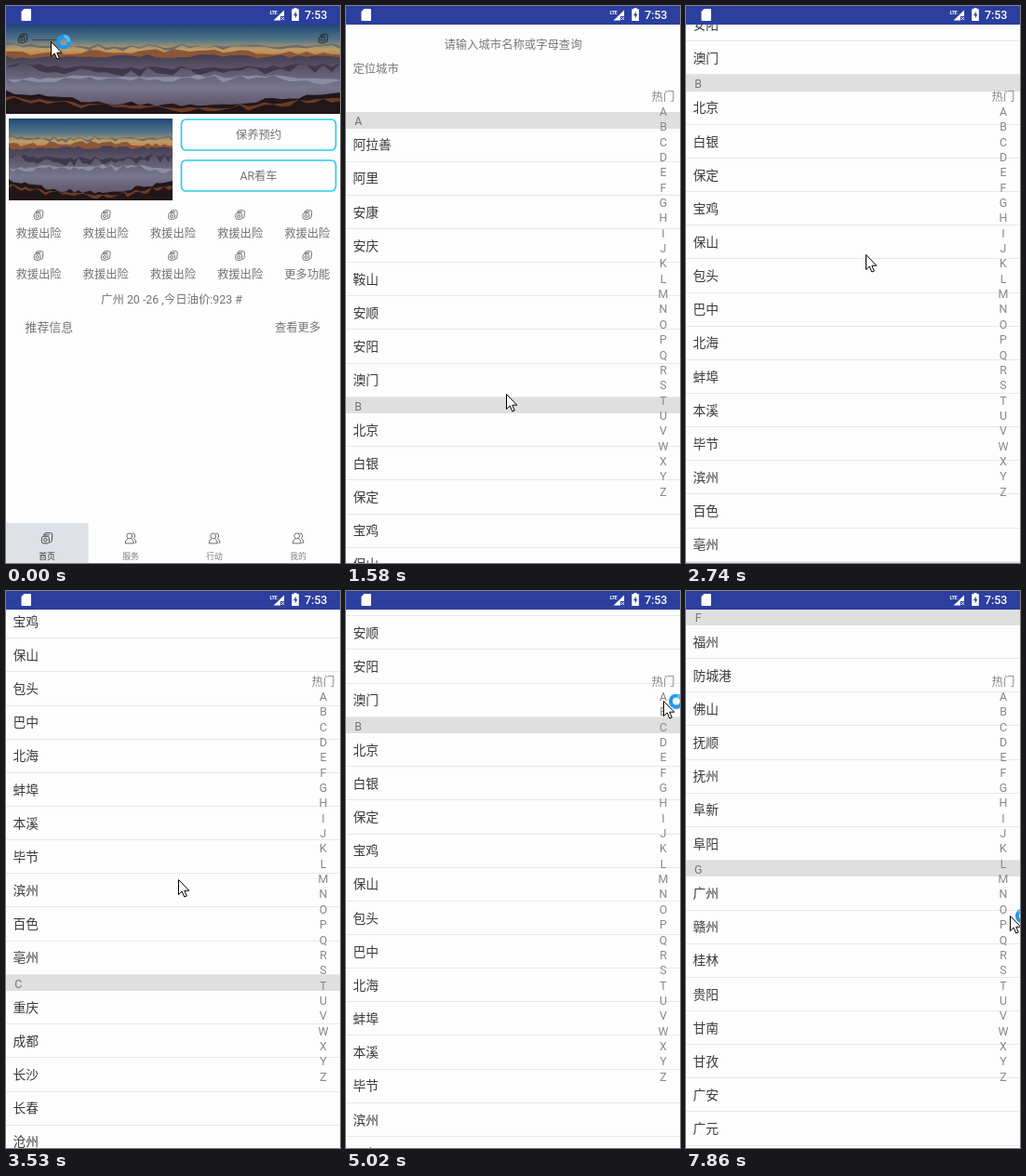
Animation, 359 px wide and 599 px high, one loop 8000 ms. Source, as an HTML page:

```html
<!DOCTYPE html>
<html lang="zh-CN">
<head>
<meta charset="utf-8">
<title>City picker</title>
<style>
  html, body { margin: 0; width: 100%; height: 100%; overflow: hidden; background: #fff; }
  svg { display: block; }
  text { font-family: Roboto, "Noto Sans CJK SC", "Noto Sans CJK", sans-serif; white-space: pre; }

  #page { animation: open 8s infinite ease-out; }
  #list { animation: scroll 8s infinite; }
  #cursor { animation: point 8s infinite steps(4); }
  #ring { animation: busy 8s infinite step-end; }
  #arc { animation: spin 1s infinite linear; }

  @keyframes open {
    0%, 6.62% { opacity: 0; transform: translateY(28px); }
    6.625% { opacity: .5; transform: translateY(28px); }
    13%, 100% { opacity: 1; transform: none; }
  }
  @keyframes scroll {
    0%, 21.1% { transform: translateY(0); animation-timing-function: steps(8); }
    34.2% { transform: translateY(-346.5px); animation-timing-function: steps(6); }
    44% { transform: translateY(-531.5px); animation-timing-function: steps(5); }
    52.2% { transform: translateY(-285px); animation-timing-function: step-end; }
    68.125% { transform: translateY(0); animation-timing-function: step-end; }
    81.25%, 100% { transform: translateY(var(--jump)); }
  }
  @keyframes point {
    0%, 8.1% { transform: translate(48px, 38px); }
    13% { transform: translate(83px, 150px); }
    17.9% { transform: translate(172px, 441px); }
    19.6% { transform: translate(172px, 417px); }
    27.6% { transform: translate(186px, 225px); }
    34.2% { transform: translate(193px, 267px); }
    37.5% { transform: translate(188px, 420px); }
    44% { transform: translate(185px, 310px); }
    48.9% { transform: translate(205px, 470px); }
    52.2% { transform: translate(329px, 110px); }
    62.7%, 68% { transform: translate(341px, 118px); }
    71% { transform: translate(340px, 136px); }
    76% { transform: translate(343px, 184px); }
    79.3%, 88% { transform: translate(343px, 190px); }
    90%, 95% { transform: translate(348px, 250px); }
    98.2%, 100% { transform: translate(348px, 349px); }
  }
  @keyframes busy {
    0% { visibility: visible; }
    8.1% { visibility: hidden; }
    61.1%, 100% { visibility: visible; }
  }
  @keyframes spin { to { transform: rotate(360deg); } }
</style>
</head>
<body>
<svg width="359" height="599" viewBox="0 0 359 599">
  <defs>
    <linearGradient id="sky" x1="0" y1="0" x2="0" y2="1">
      <stop offset="0" stop-color="#1f4673"/>
      <stop offset=".17" stop-color="#527489"/>
      <stop offset=".28" stop-color="#bd9d68"/>
      <stop offset=".36" stop-color="#c77a38"/>
    </linearGradient>
    <linearGradient id="mist" x1="0" y1="0" x2="0" y2="1">
      <stop offset="0" stop-color="#443c50"/>
      <stop offset=".55" stop-color="#77768e"/>
      <stop offset="1" stop-color="#57475a"/>
    </linearGradient>
    <symbol id="view" viewBox="0 0 360 96" preserveAspectRatio="none"><g id="ridges"></g></symbol>
    <symbol id="card" viewBox="0 0 12 12" overflow="visible">
      <g fill="none" stroke="currentColor" stroke-width=".9">
        <rect x=".8" y="4.200" width="7.400" height="7" rx="2"/>
        <path d="M3 4Q2.800 1 5 .8H9.500Q11.500.8 11.300 3L10.800 8.500Q10.600 10 8.800 10.300M3.500 2.800H8.500"/>
        <circle cx="4.500" cy="7.700" r="1.600"/>
      </g>
    </symbol>
    <symbol id="people" viewBox="0 0 12 12" overflow="visible">
      <g fill="none" stroke="currentColor" stroke-width=".9">
        <circle cx="4.800" cy="3.800" r="2.700"/>
        <path d="M3.400 6.400Q.8 7.200.6 11.200H9Q8.800 7.400 6.400 6.400M7.400 1Q10.400.8 10.300 3.800 10.200 5.600 9 6.200 11.400 7.400 11.500 10.400H10"/>
      </g>
    </symbol>
  </defs>

  <g id="home"></g>
  <g id="page">
    <rect y="20" width="359" height="640" fill="#fdfdfd"/>
    <g id="list"></g>
    <g id="index"></g>
  </g>

  <g id="status">
    <rect width="359" height="20" fill="#2c3f9f"/>
    <g fill="#fff">
      <path d="M19.500 3H26Q27 3 27 4V15Q27 16 26 16H17.500Q16.500 16 16.500 15V6Z"/>
      <path d="M287.500 15.500L299 4.500V11H295V15.500Z"/>
      <path d="M309.500 3.200V2H312.500V3.200H314.800V16H307.200V3.200Z"/>
      <path d="M296 12L299 15M299 12L296 15" stroke="#fff"/>
      <text x="283.500" y="8.500" font-size="5.500" font-weight="700" letter-spacing="-.4">LTE</text>
      <text x="321" y="14" font-size="12.400" font-weight="500">7:53</text>
    </g>
    <path d="M311.800 5.500L309 10.300H310.800V13.500L313.300 8.800H311.500Z" fill="#2c3f9f"/>
  </g>

  <g id="cursor">
    <g id="ring"><g transform="translate(14 .5)" fill="none">
      <circle r="6" fill="#bfe6ff" fill-opacity=".25" stroke="#2196ea" stroke-width="4"/>
      <path id="arc" d="M0-6A6 6 0 0 1 6 0" stroke="#58c3fa" stroke-width="3"/>
    </g></g>
    <path d="M.5.500V16.500L4.200 13 6.800 19 9.300 18 6.800 12.200H11.800Z" fill="#fff" stroke="#000"/>
  </g>
</svg>
<script>
const $ = id => document.getElementById(id);
const GREY = '#747474';

// Text centred vertically on y
const label = (x, y, str, size = 12.3, fill = GREY, anchor = 'middle') =>
  `<text x="${x}" y="${y + size * .37}" font-size="${size}" fill="${fill}" text-anchor="${anchor}">${str}</text>`;
const icon = (id, x, y, size, color = '#555') =>
  `<use href="#${id}" x="${x - size / 2}" y="${y - size / 2}" width="${size}" height="${size}" color="${color}"/>`;

let seed = 7;
const rand = () => (seed = seed * 16807 % 2147483647) / 2147483647;

// Jagged mountain line, sagging in the middle, filled downwards
function ridge(y, sag, rough, fill, depth = 96) {
  let top = '', bottom = '';
  for (let x = 0; x <= 360; x += 9) {
    const h = y + sag * Math.sin(x / 360 * Math.PI) + (rand() - .5) * rough;
    top += `${x},${h} `;
    bottom = `${x},${h + depth * rand()} ` + bottom;
  }
  return `<polygon points="${top}${depth < 96 ? bottom : '360,96 0,96'}" fill="${fill}"/>`;
}

function buildView() {
  $('ridges').innerHTML = '<rect width="360" height="96" fill="url(#sky)"/>' +
    ridge(21, 2, 5, '#6f6b68', 4) +
    ridge(31, -2, 5, '#8a5638') +
    ridge(35, -1, 4, 'url(#mist)') +
    ridge(43, 3, 5, '#3e3849', 8) +
    ridge(58, -3, 4, '#8c8ba0', 6) +
    ridge(73, 13, 5, '#21161a') +
    ridge(77, 12, 5, '#6b3a27', 5);
}

function buildHome() {
  let s = '<rect width="359" height="599" fill="#fdfdfd"/>' +
    '<use href="#view" x="0" y="20" width="359" height="96"/>' +
    '<use href="#view" x="3" y="121" width="176" height="88"/>' +
    icon('card', 18, 35, 11, '#1c1c1c') + icon('card', 341, 35, 11, '#1c1c1c') +
    '<path d="M28 36.500H56" stroke="#5b3b36"/>';
  ['保养预约', 'AR看车'].forEach((name, i) => {
    const y = 122 + i * 44;
    s += `<rect x="188.500" y="${y}" width="166" height="33" rx="5" fill="#fff" stroke="#29cdf0" stroke-width="1.700"/>` +
      label(271.5, y + 16.4, name);
  });
  for (let i = 0; i < 10; i++) {
    const x = 35 + i % 5 * 72.2, y = i < 5 ? 224.5 : 268.5;
    s += icon('card', x, y, 11) + label(x, y + 20.2, i < 9 ? '救援出险' : '更多功能');
  }
  s += label(178, 315, '广州 20 -26 ,今日油价:923 #', 12.4) +
    label(20.5, 345.5, '推荐信息', 12.9, GREY, 'start') +
    label(313.5, 345, '查看更多') +
    '<rect y="556" width="88.500" height="43" fill="#dee1e6"/>';
  ['首页', '服务', '行动', '我的'].forEach((name, i) => {
    const x = 44 + i * 90;
    s += icon(i ? 'people' : 'card', x, 572.3, 13, i ? '#666' : '#444') +
      label(x, 592, name, 8.8, i ? '#808080' : '#333');
  });
  $('home').innerHTML = s;
}

const ROW = 36.15, HEAD = 17.4;
const cities = {
  A: '阿拉善 阿里 安康 安庆 鞍山 安顺 安阳 澳门',
  B: '北京 白银 保定 宝鸡 保山 包头 巴中 北海 蚌埠 本溪 毕节 滨州 百色 亳州',
  C: '重庆 成都 长沙 长春 沧州 常德 昌都 长治 常州',
  F: '福州 防城港 佛山 抚顺 抚州 阜新 阜阳',
  G: '广州 赣州 桂林 贵阳 甘南 甘孜 广安 广元 果洛'
};

function buildList() {
  const bar = (y, h, fill) =>
    `<rect y="${y}" width="359" height="${h}" fill="${fill}" shape-rendering="crispEdges"/>`;
  let y = 114.1;
  let s = label(179.5, 41, '请输入城市名称或字母查询', 12.35, '#777') +
    label(7.5, 67, '定位城市', 12.3, '#777', 'start');
  for (const [letter, names] of Object.entries(cities)) {
    if (letter === 'F') $('list').style.setProperty('--jump', `${19.5 - y}px`);
    s += bar(y, HEAD, '#dfdfdf') + label(13.2, y + 9.4, letter);
    y += HEAD;
    for (const name of names.split(' ')) {
      s += label(7.5, y + ROW / 2 - .4, name, 13.8, '#3a3a3a', 'start');
      y += ROW;
      s += bar(y - 1, 1, '#e8e8e8');
    }
  }
  $('list').innerHTML = s;
}

const STEP = 16.35, SIZE = 12.4;
const marks = ['热门', ...'ABCDEFGHIJKLMNOPQRSTUVWXYZ'];

buildView();
buildHome();
buildList();
$('index').innerHTML = marks.map((m, i) => label(341, 97 + i * STEP, m, SIZE, '#888')).join('');
const markNodes = [...$('index').children];

// Letters bulge to the left around the touched position
function drawIndex(pos) {
  markNodes.forEach((node, i) => {
    const scale = Math.max(0, 1 - (pos - i) ** 2 / 16);
    node.setAttribute('x', 341 - 70.5 * scale);
    node.setAttribute('font-size', SIZE * (1 + scale));
    node.setAttribute('opacity', i === Math.round(pos) ? 1 : 1 - scale);
  });
}

const touches = [
  { from: 5450, to: 5690, pos: 1.4 },
  { from: 6500, to: 6620, pos: 5.61 },
  { from: 7200, to: 7470, pos: 9.28 }
];
const AWAY = -9;
let shown = AWAY;
const start = performance.now();
function frame() {
  const t = (performance.now() - start) % 8000;
  const touch = touches.find(({ from, to }) => t >= from && t < to);
  const pos = touch ? touch.pos : AWAY;
  if (pos !== shown) drawIndex(shown = pos);
  requestAnimationFrame(frame);
}
frame();
</script>
</body>
</html>
```
